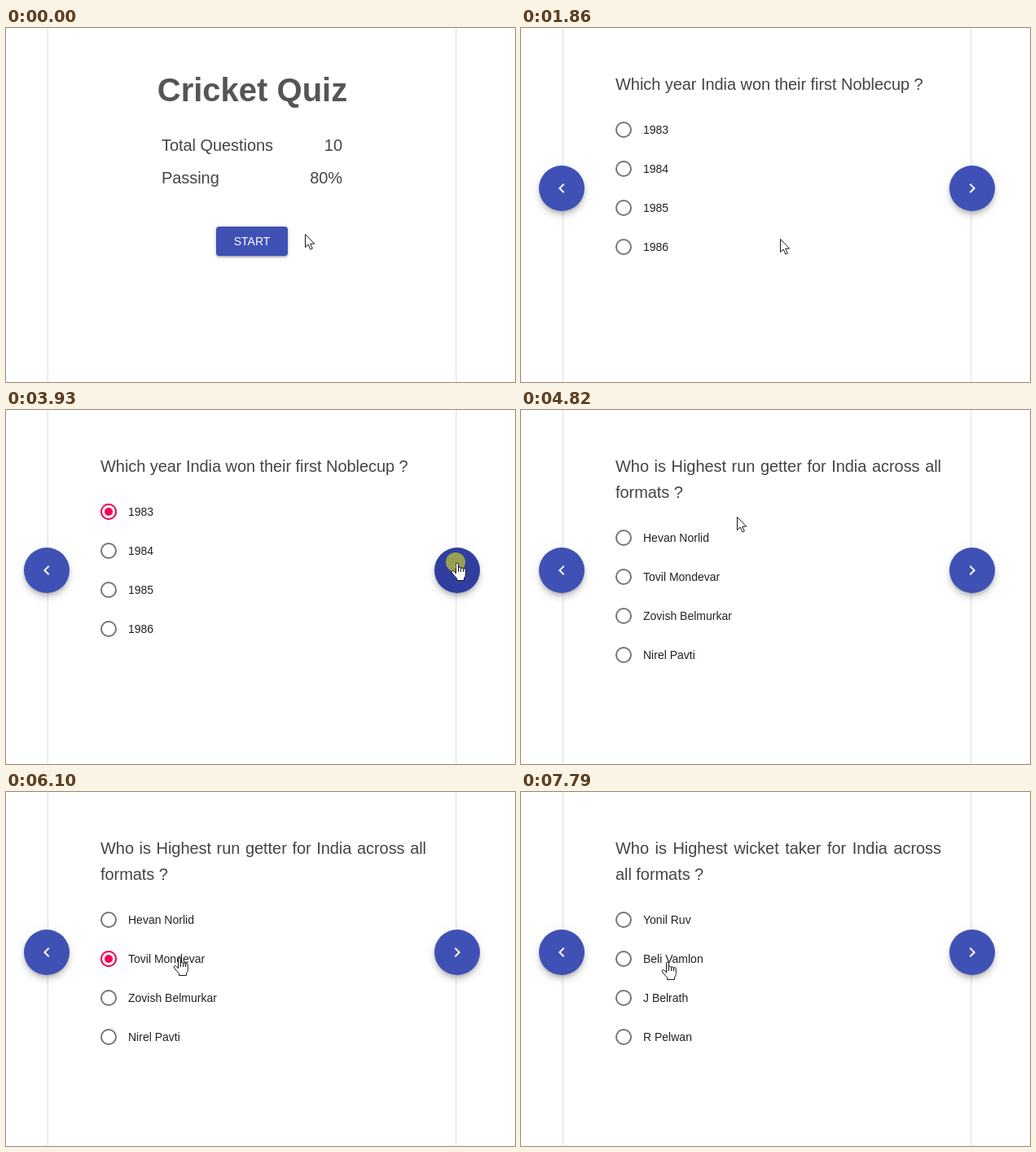
Write an HTML page that moves like this. It is 625 px wide and 435 px high and loops after 8 s.

```html
<!DOCTYPE html>
<html lang="en">
<head>
<meta charset="utf-8">
<title>Cricket Quiz</title>
<style>
  html, body { margin: 0; width: 100%; height: 100%; overflow: hidden; background: #fff; }
  .stage {
    position: relative; width: 625px; height: 435px; overflow: hidden;
    font: 14px/20px "Liberation Sans", Arial, sans-serif;
    --blue: #3f51b5; --blue-dark: #303f9f; --pink: #f50057;
  }
  .stage div, .stage h1, .start span, .stage svg { position: absolute; }
  .card {
    left: 52px; top: -30px; width: 500px; height: 500px; background: #fff;
    box-shadow: 0 1px 3px #0003, 0 0 1px #00000038;
  }

  /* pages */
  .page { inset: 0; opacity: 0; color: #444; animation: 8s step-end infinite; }
  .start { animation-name: start; }
  .q1 { animation-name: q1; }
  .q2 { animation-name: q2; }
  .q3 { animation-name: q3; }
  @keyframes start { 0% { opacity: 1 } 19.625%, 100% { opacity: 0 } }
  @keyframes q1 { 0% { opacity: 0 } 19.625% { opacity: 1 } 51%, 100% { opacity: 0 } }
  @keyframes q2 { 0% { opacity: 0 } 51% { opacity: 1 } 88.375%, 100% { opacity: 0 } }
  @keyframes q3 { 0% { opacity: 0 } 88.375%, 100% { opacity: 1 } }

  h1 {
    left: 52px; top: 52px; width: 501px; margin: 0; text-align: center;
    font-size: 40px; line-height: 48px; color: #555;
  }
  .start span { font-size: 20px; line-height: 32px; letter-spacing: -.06px; }
  .start .key { left: 191px; }
  .start .val { right: 212px; }
  .button {
    left: 258px; top: 244px; width: 88px; height: 36px; border-radius: 4px;
    color: #fff; line-height: 36px; text-align: center; background: var(--blue);
    box-shadow: 0 1px 5px #0003, 0 2px 2px #00000024, 0 3px 1px -2px #0000001f;
    animation: hoverStart 8s linear infinite;
  }
  @keyframes hoverStart {
    0%, 12.6% { background: var(--blue) }
    15.7%, 100% { background: var(--blue-dark) }
  }

  .page p {
    position: absolute; left: 116px; top: 53px; width: 400px; margin: 0;
    font-size: 20px; line-height: 32px; text-align: justify; letter-spacing: -.06px;
  }
  ul { position: absolute; left: 116px; top: 101px; margin: 0; padding: 0; list-style: none; }
  .q2 ul, .q3 ul { top: 133px; }
  li { position: relative; height: 48px; padding-left: 34px; line-height: 48px; color: #000000de; white-space: nowrap; }
  li::before {
    content: ""; position: absolute; left: 0; top: 14px; width: 16px; height: 16px;
    border: 2px solid #757575; border-radius: 50%;
  }
  .pick::after {
    content: ""; position: absolute; left: 5px; top: 19px; width: 10px; height: 10px;
    border-radius: 50%; background: var(--pink);
    box-shadow: 0 0 0 3px #fff, 0 0 0 5px var(--pink);
    animation: pick1 8s step-end infinite;
  }
  .q2 .pick::after { animation-name: pick2; }
  @keyframes pick1 { 0% { opacity: 0 } 36.25%, 100% { opacity: 1 } }
  @keyframes pick2 { 0% { opacity: 0 } 74.875%, 100% { opacity: 1 } }

  /* round navigation buttons */
  .nav { inset: 0; animation: nav 8s step-end infinite; }
  @keyframes nav { 0% { opacity: 0 } 19.625%, 100% { opacity: 1 } }
  .fab {
    top: 169px; width: 56px; height: 56px; border-radius: 50%; background: var(--blue);
    box-shadow: 0 3px 5px -1px #0003, 0 6px 10px #00000024, 0 1px 18px #0000000d;
  }
  .fab svg { left: 16px; top: 16px; fill: #fff; }
  .prev { left: 22px; }
  .next { left: 526px; animation: hoverNext 8s linear infinite; }
  @keyframes hoverNext {
    0%, 45.6%, 55.9%, 82%, 92.2%, 100% { background: var(--blue) }
    48.6%, 52.75%, 85.1%, 89.1% { background: var(--blue-dark) }
  }

  /* pointer */
  .pointer {
    left: 0; top: 0; overflow: visible;
    fill: #fff; stroke: #15151f; stroke-linejoin: round;
    animation: move 8s ease-in-out infinite, shape 8s step-end infinite, press 8s step-end infinite;
  }
  .hand { opacity: var(--hand); }
  .arrow { opacity: calc(1 - var(--hand)); }
  .ring { opacity: var(--press); fill: #ff0; fill-opacity: .5; stroke: none; }
  @keyframes move {
    0%, 9.75% { transform: translate(367px, 253px) }
    15.5%, 25.5% { transform: translate(318px, 259px) }
    31.5%, 36.5% { transform: translate(161px, 122px) }
    42.1%, 43.7% { transform: translate(576px, 174px) }
    45% { transform: translate(570px, 170px) }
    46.5%, 51% { transform: translate(552px, 187px); animation-timing-function: ease-in }
    60.25%, 60.5% { transform: translate(265px, 131px); animation-timing-function: linear }
    60.6%, 61.3% { transform: translate(240px, 134px) }
    67.5% { transform: translate(193px, 200px) }
    69.9%, 76.5% { transform: translate(211px, 203px) }
    83.25% { transform: translate(557px, 188px) }
    83.9%, 88.3% { transform: translate(559px, 189px) }
    95.75%, 97.24% { transform: translate(212px, 215px) }
    97.25%, 100% { transform: translate(178px, 208px) }
  }
  @keyframes shape {
    0%, 19.625%, 37.5%, 52.75%, 77.5%, 89.5% { --hand: 0 }
    12.625%, 31%, 45.625%, 61.875%, 82%, 95.3%, 100% { --hand: 1 }
  }
  @keyframes press {
    0%, 19.625%, 36.25%, 51%, 74.875%, 88.375%, 100% { --press: 0 }
    18.3%, 34.9%, 49%, 73.5%, 87% { --press: 1 }
  }
</style>
</head>
<body>
<div class="stage">
  <div class="card"></div>

  <div class="page start">
    <h1>Cricket Quiz</h1>
    <span class="key" style="top:128px">Total Questions</span>
    <span class="val" style="top:128px">10</span>
    <span class="key" style="top:168px">Passing</span>
    <span class="val" style="top:168px">80%</span>
    <div class="button">START</div>
  </div>

  <div class="page q1">
    <p>Which year India won their first Noblecup ?</p>
    <ul><li class="pick">1983</li><li>1984</li><li>1985</li><li>1986</li></ul>
  </div>

  <div class="page q2">
    <p>Who is Highest run getter for India across all formats ?</p>
    <ul><li>Hevan Norlid</li><li class="pick">Tovil Mondevar</li><li>Zovish Belmurkar</li><li>Nirel Pavti</li></ul>
  </div>

  <div class="page q3">
    <p>Who is Highest wicket taker for India across all formats ?</p>
    <ul><li>Yonil Ruv</li><li>Beli Vamlon</li><li>J Belrath</li><li>R Pelwan</li></ul>
  </div>

  <div class="nav">
    <div class="fab prev"><svg width="24" height="24"><path d="M15.4 7.4 14 6l-6 6 6 6 1.4-1.4-4.6-4.6z"/></svg></div>
    <div class="fab next"><svg width="24" height="24"><path d="M10 6 8.6 7.4l4.6 4.6-4.6 4.6L10 18l6-6z"/></svg></div>
  </div>

  <svg class="pointer" width="1" height="1">
    <circle class="ring" r="12"/>
    <path class="arrow" d="M.5 .5V16.5L4.2 13l2.7 6 2.5-1.1-2.7-5.8h5z"/>
    <g class="hand" transform="translate(1 .5)">
      <path d="M-.5 13.5V2a1.5 1.5 0 0 1 3 0V7a1.5 1.4 0 0 1 3 0v.8a1.5 1.4 0 0 1 3 0v.8a1.4 1.4 0 0 1 2.8 0V15q0 2-1.8 4.4V22H.6v-2.4Q-2 17-5.5 12.6q-1-2 .6-2.6 1.6-.3 3.1 1.7z"/>
      <path fill="none" d="M2.5 7v4.5M5.5 7.5v4M8.5 8.5v3"/>
    </g>
  </svg>
</div>
</body>
</html>
```
